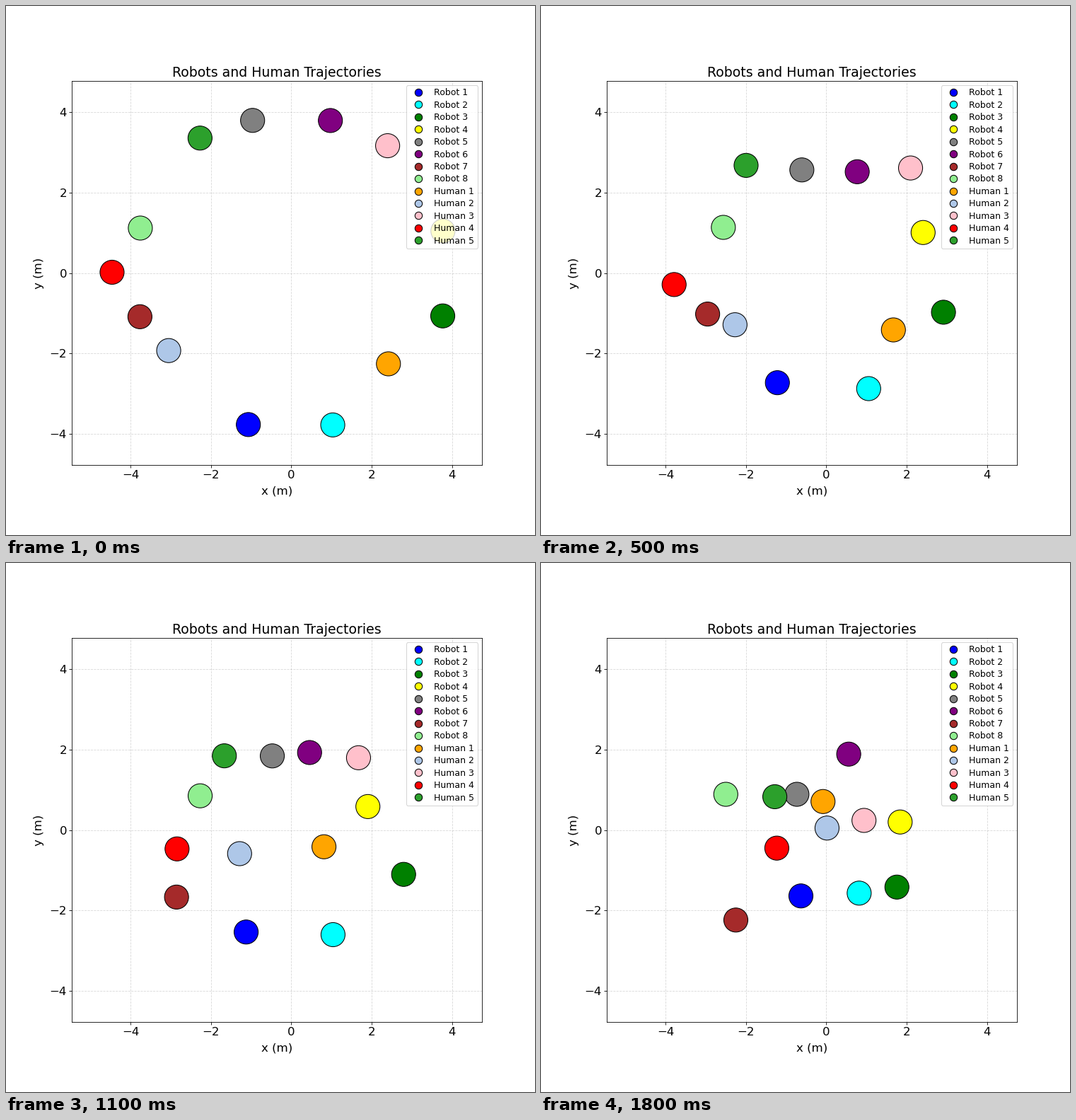
Animation, 748 px wide and 748 px high, one loop 1900 ms. Source, as a matplotlib script:

```python
import numpy as np
import matplotlib.pyplot as plt
from matplotlib.animation import FuncAnimation
from matplotlib.patches import Circle, FancyBboxPatch

SIZE = 748
SCALE = 56.8             # pixels per metre
ORIGIN = (403.3, 377.6)  # stage position of (0, 0)
LEFT, TOP, RIGHT, BOTTOM = 93.2, 106.1, 673.2, 649.1
FRAMES, INTERVAL = 19, 100
RING = 3.92              # radius on which the robots start
ROBOT_TIMES = (0, 7, 10, 15, 18)
HUMAN_TIMES = (0, 10, 18)

plt.rcParams["font.family"] = "DejaVu Sans"


def to_x(px):
    return (px - ORIGIN[0]) / SCALE


def to_y(py):
    return (ORIGIN[1] - py) / SCALE


def smooth(times, values):
    """Monotone cubic curve through the key values, sampled once per frame."""
    times, values = np.array(times), np.array(values, float)
    step = np.diff(times)
    rate = np.diff(values) / step
    slope = np.zeros(len(values))
    slope[0], slope[-1] = rate[0], rate[-1]
    for i, (a, b) in enumerate(zip(rate, rate[1:]), 1):
        if a * b > 0:
            wa = step[i - 1] + 2 * step[i]
            wb = 2 * step[i - 1] + step[i]
            slope[i] = (wa + wb) / (wa / a + wb / b)
    t = np.arange(FRAMES)
    k = np.clip(np.searchsorted(times, t, side="right") - 1, 0, len(step) - 1)
    h = step[k]
    u = (t - times[k]) / h
    return ((1 + 2 * u) * (1 - u) ** 2 * values[k]
            + u * (1 - u) ** 2 * h * slope[k]
            + u ** 2 * (3 - 2 * u) * values[k + 1]
            + u ** 2 * (u - 1) * h * slope[k + 1])


fig = plt.figure(figsize=(10, 10), dpi=SIZE / 10, facecolor="white")
ax = fig.add_axes([LEFT / SIZE, 1 - BOTTOM / SIZE,
                   (RIGHT - LEFT) / SIZE, (BOTTOM - TOP) / SIZE])
ax.set_xlim(to_x(LEFT), to_x(RIGHT))
ax.set_ylim(to_y(BOTTOM), to_y(TOP))
ax.set_xticks(range(-4, 5, 2))
ax.set_yticks(range(-4, 5, 2))
ax.tick_params(labelsize=16)
ax.set_axisbelow(True)
ax.grid(True, linestyle="--", alpha=0.5)
ax.set_title("Robots and Human Trajectories", fontsize=18.2)
ax.set_xlabel("x (m)", fontsize=16, labelpad=7)
ax.set_ylabel("y (m)", fontsize=16, labelpad=7)

# Legend box, translucent above the discs
ax.add_patch(FancyBboxPatch(
    (to_x(565.5), to_y(342.6)), 101.6 / SCALE, 230.4 / SCALE,
    boxstyle=f"round,pad=0,rounding_size={2.5 / SCALE}",
    facecolor="white", edgecolor="0.8", linewidth=1, alpha=0.8,
    snap=True, zorder=5))

agents = []


def add_agent(name, color, times, points):
    """Add a moving disc and its legend row."""
    row = 122 + 17.44 * len(agents)
    ax.plot(to_x(583), to_y(row), "o", markersize=10, color=color,
            markeredgecolor="black", markeredgewidth=1, zorder=6)
    ax.text(to_x(605.2), to_y(row + 4.4), name, fontsize=12,
            va="baseline", zorder=6)
    path = np.column_stack([smooth(times, axis) for axis in zip(*points)])
    disc = Circle(path[0], 0.3, facecolor=color, edgecolor="black",
                  linewidth=1, zorder=3)
    ax.add_patch(disc)
    agents.append((disc, path))


def robot(number, color, angle, *stops):
    """Start on the ring, slow down at the first two stops, then dodge."""
    a = np.radians(angle)
    start = (RING * np.cos(a), RING * np.sin(a))
    add_agent(f"Robot {number}", color, ROBOT_TIMES, (start, *stops))


def human(number, color, *points):
    """Cross the field steadily from start through middle to end."""
    add_agent(f"Human {number}", color, HUMAN_TIMES, points)


robot(1, "blue", -105.8, (-1.24, -2.56), (-1.15, -2.6), (-0.99, -1.86), (-0.63, -1.64))
robot(2, "cyan", -74.7, (1.06, -2.71), (1.05, -2.68), (0.95, -1.87), (0.82, -1.57))
robot(3, "green", -15.8, (2.78, -0.96), (2.87, -1.07), (2.01, -1.24), (1.76, -1.42))
robot(4, "yellow", 15.5, (2.11, 0.98), (1.98, 0.7), (1.62, 0.19), (1.84, 0.2))
robot(5, "gray", 104.2, (-0.52, 2.24), (-0.47, 2.01), (-0.5, 1.0), (-0.73, 0.89))
robot(6, "purple", 75.6, (0.68, 2.21), (0.51, 2.03), (0.3, 1.52), (0.56, 1.89))
robot(7, "brown", 196.1, (-2.82, -1.01), (-2.89, -1.53), (-2.44, -2.1), (-2.25, -2.24))
robot(8, "lightgreen", 163.4, (-2.34, 1.14), (-2.3, 0.87), (-2.1, 0.82), (-2.5, 0.89))
human(1, "orange", (2.42, -2.26), (0.95, -0.58), (-0.08, 0.71))
human(2, "#aec7e8", (-3.05, -1.93), (-1.46, -0.69), (0.02, 0.05))
human(3, "pink", (2.4, 3.17), (1.76, 1.97), (0.94, 0.24))
human(4, "red", (-4.46, 0.02), (-3.03, -0.47), (-1.23, -0.45))
human(5, "#2ca02c", (-2.27, 3.36), (-1.72, 1.99), (-1.28, 0.83))


def update(frame):
    for disc, path in agents:
        disc.center = path[frame]
    return [disc for disc, _ in agents]


anim = FuncAnimation(fig, update, frames=FRAMES, interval=INTERVAL,
                     init_func=lambda: update(0), repeat=True,
                     repeat_delay=0, blit=False)
plt.show()
```
